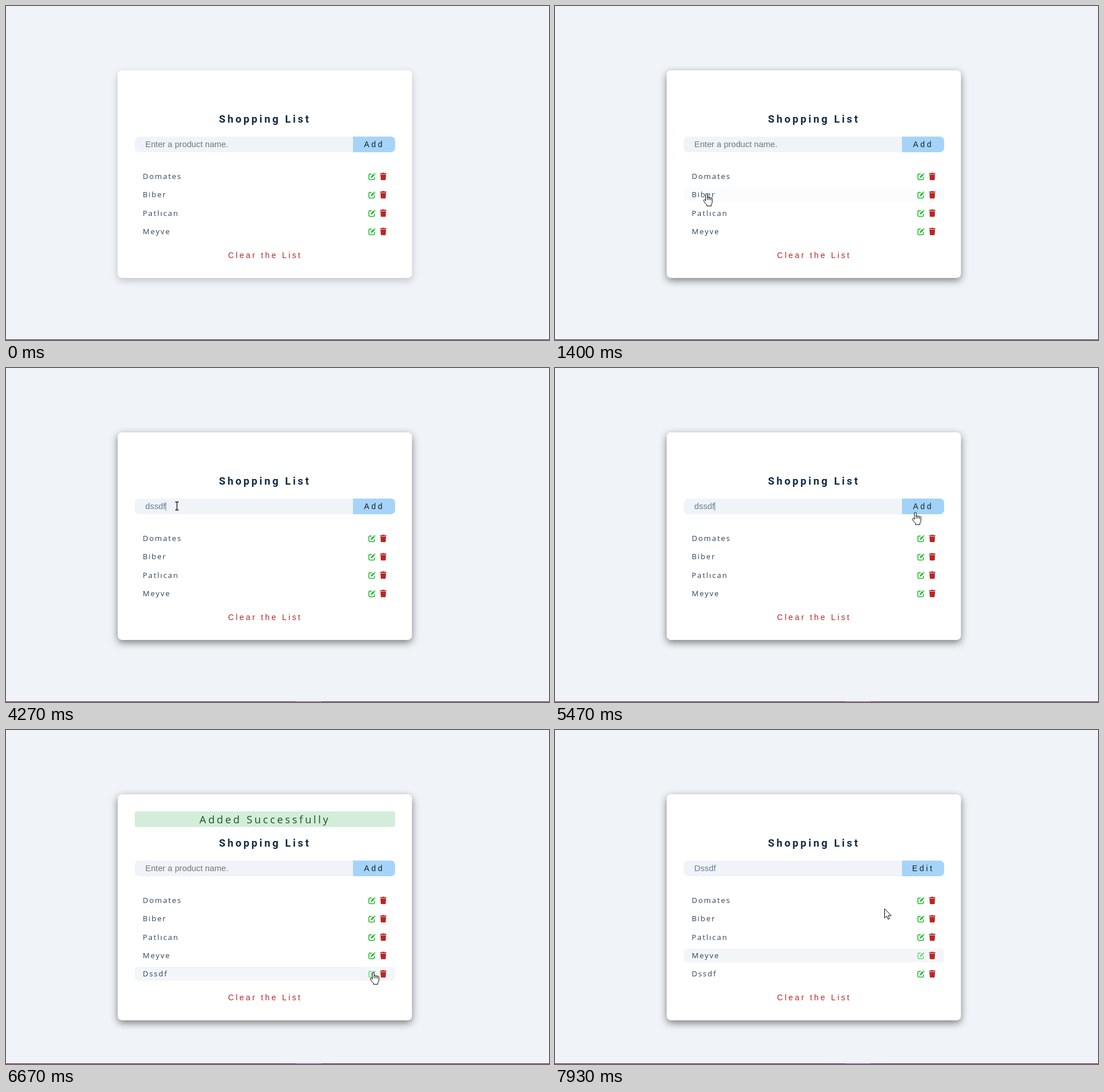
An HTML page that plays this animation: 953x587 px, repeating every 8000 ms.

```html
<!DOCTYPE html>
<html lang="en">
<head>
<meta charset="utf-8">
<title>Shopping List</title>
<style>
html, body { margin: 0; width: 100%; height: 100%; overflow: hidden; background: #f0f4f8; }
svg { display: block; width: 953px; height: 587px; }
text { white-space: pre; }
.ui { font-family: "Liberation Sans", Arial, sans-serif; }
.body { font-family: "Open Sans", sans-serif; }
.mid { text-anchor: middle; letter-spacing: 3.68px; }
.title { font: 700 18.4px Roboto, sans-serif; fill: #102a42; }
.alert { font-size: 18.4px; fill: #155724; }
.field { font-size: 14.72px; }
.item { font-size: 13.2px; letter-spacing: 1.9px; fill: #2b435a; }
.clear { font-size: 14px; letter-spacing: 3.4px; fill: #bb2525; }
.btn { font-size: 14px; }
.cur { fill: #fff; stroke: #000; stroke-linejoin: round; stroke-linecap: round; }
</style>
</head>
<body>
<svg viewBox="0 0 953 587">
  <defs>
    <filter id="blur" x="-10%" y="-10%" width="120%" height="125%"><feGaussianBlur stdDeviation="6.9"/></filter>
    <clipPath id="half"><rect x="609" y="229" width="80" height="29"/></clipPath>
    <g id="pen" fill="none" stroke="currentColor">
      <path d="M5.2 2.4H2.5Q.9 2.4 .9 4V10.6Q.9 12.2 2.5 12.2H9.1Q10.7 12.2 10.7 10.6V8" stroke-width="1.6" stroke-linecap="round"/>
      <path d="M5.6 7.5L10 3.1M10.8 2.3L11.6 1.5" stroke-width="3.1"/>
      <path d="M4.5 6.4L3.9 9.2 6.7 8.6z" fill="currentColor" stroke="none"/>
    </g>
    <g id="bin" fill="#bb2525">
      <rect y=".8" width="11.4" height="1.7" rx=".8"/>
      <rect x="3.4" width="4.6" height="2" rx=".8"/>
      <path d="M.8 3.3H10.6L10 12Q9.9 13 8.9 13H2.5Q1.5 13 1.4 12z"/>
    </g>
  </defs>
  <rect width="953" height="587" fill="#f0f4f8"/>
  <rect id="shadow" x="196" y="117.6" width="516.5" rx="7.4" filter="url(#blur)"/>
  <rect id="card" x="196" y="113" width="516.5" rx="7.4" fill="#fff"/>
  <g id="alert">
    <rect x="226" y="143" width="457" height="27.5" rx="3.7" fill="#d4edda"/>
    <text class="body mid alert" x="454.4" y="164">Added Successfully</text>
  </g>
  <text class="mid title" x="454.4" y="204.7">Shopping List</text>
  <rect x="226" y="229.5" width="457" height="27.5" rx="7.4" fill="#f0f4f8"/>
  <rect id="btn" x="226" y="229.5" width="457" height="27.5" rx="7.4" clip-path="url(#half)"/>
  <text id="label" class="ui mid btn" x="646.2" y="248"></text>
  <text id="field" class="ui field" x="244.6" y="248"></text>
  <rect id="caret" y="236" width="1" height="15" fill="#617d98"/>
  <g id="rows"></g>
  <text id="clear" class="ui mid clear" x="454.8">Clear the List</text>
  <rect y="586" width="953" height="1" fill="#6a0f4e"/>
  <rect id="task" x="509" y="586" width="45" height="1" fill="#b02a8c"/>
  <path id="arrow" class="cur" d="M0 0V16l3.7-3.4 2.5 5.6 2.4-1.1-2.4-5.4h5z"/>
  <g id="hand" class="cur">
    <path d="M-1.5 12.5V2a1.6 1.6 0 0 1 3.2 0V7.5a1.5 1.5 0 0 1 2.9.2a1.5 1.5 0 0 1 2.8.6a1.4 1.4 0 0 1 2.6 1V14.5q0 2.6-1.8 4.8V22H.4V19.6Q-2.8 17-5 13a1.5 1.5 0 0 1 2.2-1.8z"/>
    <path d="M1.7 7.5V11M4.6 8V11M7.4 8.6V11.5" fill="none"/>
  </g>
  <path id="beam" d="M-3-7H3M0-7V7M-3 7H3" fill="none" stroke="#111" stroke-width="1.3"/>
</svg>
<script>
const LOOP = 8000, STEP = 200 / 3, PITCH = 32.25, BLINK = 530;
const FOCUS = 2070, TYPING = 4000, TYPED = 4270, ADDED = 5670, EDITING = 7070, ALERT_END = 7670;
const names = ["Domates", "Biber", "Patlıcan", "Meyve", "Dssdf"];
const $ = id => document.getElementById(id);

// pointer moves: arrival time, duration, x, y
const moves = [
  [70, 1, 916, 572],
  [470, 400, 84, 490],
  [1200, 650, 216, 338],
  [1400, 200, 266, 329.5],
  [1800, 400, 291.5, 246],
  [2533, 70, 300, 242.5],
  [5200, 400, 585, 264],
  [5533, 333, 637.5, 252],
  [6400, 190, 644.5, 425],
  [7533, 100, 643, 397],
  [7933, 60, 578.5, 314.5]
];

const clamp = v => Math.min(1, Math.max(0, v));
const ease = k => k * k * (3 - 2 * k);

function pointer(t) {
  t = Math.floor((t + 3.4) / STEP) * STEP + 1;
  if (t < 60) return null;
  let [, , x, y] = moves[0];
  for (const [end, span, toX, toY] of moves) {
    const k = ease(clamp((t - end + span) / span));
    x += (toX - x) * k;
    y += (toY - y) * k;
  }
  return [x, y];
}

const inside = (p, x, y, w, h) => p && p[0] >= x && p[0] < x + w && p[1] >= y && p[1] < y + h;
const mid = i => 299.5 + PITCH * i;
const count = t => t < ADDED ? 4 : 5;
const onCard = p => inside(p, 196, 113, 516, 390);
const onField = p => inside(p, 226, 229, 383, 28);
const onBtn = p => inside(p, 609, 229, 74, 28);
const onRow = i => (p, t) => i < count(t) && inside(p, 226, mid(i) - 12.2, 457, 24.4);
const onPen = i => (p, t) => i < count(t) && inside(p, 635, mid(i) - 7, 15, 14);

// hover transition: ramps up while the pointer is over, down otherwise
function hover(hit, t, span) {
  let v = 0;
  for (let u = Math.max(0, t - 1000); u < t; u += 10) {
    const s = u - 60;
    v = clamp(v + (hit(pointer(s), s) ? 10 : -10) / span);
  }
  return v;
}

const mix = (a, b, k) => "rgb(" + a.map((c, i) => Math.round(c + (b[i] - c) * k)) + ")";
const show = (el, on) => { el.style.display = on ? "" : "none"; };

$("rows").innerHTML = names.map((n, i) => {
  const y = mid(i);
  return `<g><rect x="226" y="${y - 12.2}" width="457" height="24.4" rx="6"/>
    <text class="body item" x="239.9" y="${y + 4.6}">${n}</text>
    <g transform="translate(636 ${y - 6.5})"><use href="#pen"/></g>
    <g transform="translate(656.4 ${y - 6.5})"><use href="#bin"/></g></g>`;
}).join("");
const rows = [...$("rows").children];

function typed(t) {
  if (t >= EDITING) return "Dssdf";
  if (t < TYPING || t >= ADDED) return "";
  return "dssdf".slice(0, 1 + Math.floor((t - TYPING) / 66));
}

function caretOn(t) {
  const since = Math.max(0, t - (t < TYPING ? FOCUS : TYPED));
  return t >= FOCUS && t < ADDED && Math.floor(since / BLINK) % 2 === 0;
}

function draw(t) {
  const p = pointer(t), grow = (count(t) - 4) * PITCH;
  $("card").setAttribute("height", 365 + grow);
  $("shadow").setAttribute("height", 365 + grow);
  $("shadow").setAttribute("opacity", 0.2 + 0.3 * hover(onCard, t, 300));
  $("clear").setAttribute("y", 442.8 + grow);
  show($("alert"), t >= ADDED && t < ALERT_END);
  show($("task"), t >= FOCUS);

  const b = hover(onBtn, t, 250);
  $("btn").setAttribute("fill", mix([165, 212, 248], [73, 166, 233], b));
  $("label").setAttribute("fill", mix([20, 32, 43], [255, 255, 255], b));
  $("label").textContent = t < EDITING ? "Add" : "Edit";

  const text = typed(t), field = $("field");
  field.textContent = text || "Enter a product name.";
  field.setAttribute("fill", text ? "#617d98" : "#757575");
  const end = text ? field.getComputedTextLength() : 0.4;
  $("caret").setAttribute("x", Math.round(244.6 + end));
  show($("caret"), caretOn(t));

  rows.forEach((g, i) => {
    show(g, i < count(t));
    g.children[0].setAttribute("fill", mix([255, 255, 255], [243, 246, 249], hover(onRow(i), t, 200)));
    g.children[2].style.color = mix([37, 187, 50], [107, 218, 117], hover(onPen(i), t, 200));
  });

  const overRow = names.some((_, i) => onRow(i)(p, t));
  const kind = onField(p) ? "beam" : onBtn(p) || overRow ? "hand" : "arrow";
  for (const id of ["arrow", "hand", "beam"]) {
    show($(id), p && id === kind);
    if (p) $(id).setAttribute("transform", `translate(${p[0]} ${p[1]})`);
  }
}

const start = performance.now();
function tick() {
  draw((performance.now() - start) % LOOP);
  requestAnimationFrame(tick);
}
tick();
</script>
</body>
</html>
```
